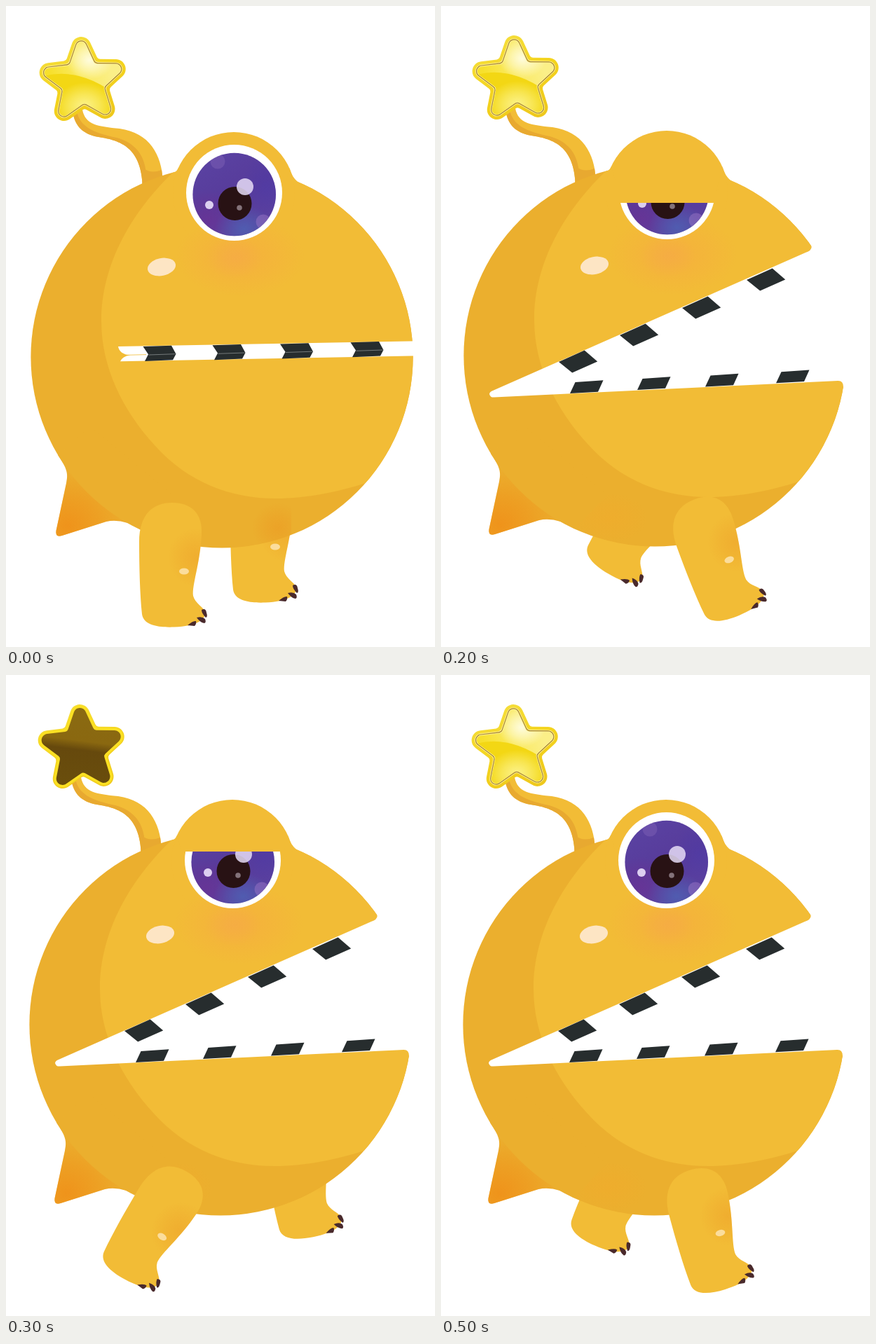
An HTML page with a canvas that plays this animation: 612 by 915 pixels, repeating every 600 ms.

```html
<!DOCTYPE html>
<html lang="en">
<head>
<meta charset="utf-8">
<title>Walking monster</title>
<style>
html, body { margin: 0; width: 100%; height: 100%; overflow: hidden; background: #fff; }
canvas { display: block; }
</style>
</head>
<body>
<canvas id="stage" width="612" height="915"></canvas>
<script>
const ctx = document.getElementById('stage').getContext('2d');
const LIGHT = '#f2bc36', SHADE = '#ebaf2e', INK = '#272d2e', CLAW = '#4a2a2c';
const STEP = 100;

// Walk poses: body shift, eyelid height, legs as [x, y, degrees]
const poses = [
  { dx: 0, dy: 0, lid: 0, near: [237, 745, 0], far: [367, 710, 0] },
  { dx: -.5, dy: -1, lid: 254, dark: true, near: [244, 743, 23], far: [362, 691, -22] },
  { dx: -3, dy: -2, lid: 281, open: true, near: [374, 738, -20], far: [313, 690, 33] },
  { dx: -2, dy: -2, lid: 252, open: true, dark: true, near: [240, 740, 31], far: [413, 663, -9] },
  { dx: -.8, dy: 0, lid: 283, near: [267, 740, 10], far: [387, 690, -7] },
  { dx: -4, dy: -2, lid: 0, open: true, near: [366, 741, -15], far: [279, 686, 26] }
];

function shape(d, color) {
  ctx.fillStyle = color;
  ctx.fill(new Path2D(d));
}

function oval(x, y, rx, ry, color, turn = 0) {
  ctx.beginPath();
  ctx.ellipse(x, y, rx, ry, turn, 0, Math.PI * 2);
  ctx.fillStyle = color;
  ctx.fill();
}

const disc = (x, y, r, color) => oval(x, y, r, r, color);

// Soft spot of an 'r,g,b' colour
function glow(x, y, rx, ry, rgb, alpha) {
  ctx.save();
  ctx.translate(x, y);
  ctx.scale(1, ry / rx);
  const g = ctx.createRadialGradient(0, 0, 0, 0, 0, rx);
  g.addColorStop(0, `rgba(${rgb},${alpha})`);
  g.addColorStop(.5, `rgba(${rgb},${alpha * .55})`);
  g.addColorStop(1, `rgba(${rgb},0)`);
  disc(0, 0, rx, g);
  ctx.restore();
}

function ramp(x0, y0, x1, y1, stops) {
  const g = ctx.createLinearGradient(x0, y0, x1, y1);
  stops.forEach(([at, color]) => g.addColorStop(at, color));
  return g;
}

function clipped(path, draw) {
  ctx.save();
  ctx.clip(path);
  draw();
  ctx.restore();
}

const legPath = new Path2D('M-47 20C-47-20-27-36 0-36C28-36 44-20 42 10C40 50 28 82 30 97' +
  'C33 108 43 111 48 121C46 132 35 140 3 141.5C-22 142.5-41 138-43 123C-46 95-47 55-47 20Z');

function leg([x, y, deg]) {
  ctx.save();
  ctx.translate(x, y);
  ctx.rotate(deg * Math.PI / 180);
  ctx.fillStyle = LIGHT;
  ctx.fill(legPath);
  clipped(legPath, () => glow(34, 42, 40, 42, '236,150,36', .38));
  oval(17, 62, 7, 4.5, '#fbdd9c');
  shape('M42 117Q48 114 49 121Q51 127 48 128Q42 122 42 117Z' +
    'M35 128Q43 126 47 130Q49 135 46 136Q40 135 35 128Z' +
    'M22 139Q30 132 34 133Q35 137 32 140Z', CLAW);
  ctx.restore();
}

function antenna() {
  shape('M95 150C98 172 110 183 132 187C164 192 193 202 195 258L224 250' +
    'C222 212 205 181 162 175C132 172 113 170 109 148Z', LIGHT);
  shape('M95 150C98 172 110 183 132 187C164 192 193 202 195 258L199 232' +
    'C195 208 180 194 158 188C124 181 105 172 101 150Z', '#e8a930');
  shape('M197 232Q207 240 222 234L224 254L194 258Z', '#e8a930');
}

// Star outline grown outwards by pad, with rounded tips and notches
function starPath(pad) {
  const path = new Path2D();
  const at = i => {
    const a = (-93 + 36 * i) * Math.PI / 180;
    const r = i % 2 ? 22 + 1.18 * pad : 50 + 2.69 * pad;
    return [110 + r * Math.cos(a), 108 + r * Math.sin(a)];
  };
  const [ax, ay] = at(0), [bx, by] = at(1);
  path.moveTo((ax + bx) / 2, (ay + by) / 2);
  for (let i = 1; i <= 10; i++) path.arcTo(...at(i), ...at(i + 1), i % 2 ? 5 : pad);
  path.closePath();
  return path;
}

function starLayer(pad, paint) {
  ctx.fillStyle = paint;
  ctx.fill(starPath(pad));
}

function star(dark) {
  starLayer(14, ramp(80, 50, 140, 160, [[0, '#f5de3c'], [.5, '#f4d41e'], [1, '#eec81c']]));
  if (dark) {
    starLayer(12.5, '#fbe022');
    starLayer(9, ramp(118, 50, 104, 160,
      [[0, '#8a6a12'], [.42, '#8a6810'], [.54, '#66490d'], [1, '#6a4e0c']]));
    return;
  }
  starLayer(9.6, '#fff3a0');
  starLayer(8.7, '#a8862a');
  starLayer(7.5, '#fbf0a0');
  starLayer(6.7, ramp(65, 100, 140, 70, [[0, '#f7e02c'], [.5, '#faea62'], [1, '#fbef88']]));
  clipped(starPath(6.7), () => {
    glow(119, 77, 34, 28, '255,255,240', .85);
    shape('M50 101Q100 86 152 123V175H50Z', '#f3d714');
    glow(112, 143, 42, 34, '254,248,160', .85);
  });
}

const bodyPath = new Path2D();
bodyPath.arc(308, 501, 272.6, 0, Math.PI * 2);
const tailPath = new Path2D('M74 641C87 660 89 667 86 681L71.5 749Q70 759 80 756L143 736' +
  'Q167 731 194 748L240 700L120 600Z');
const trunk = new Path2D(bodyPath);
trunk.addPath(tailPath);

function body(open) {
  ctx.fillStyle = SHADE;
  ctx.fill(bodyPath);
  ctx.fill(tailPath);
  clipped(trunk, () => {
    glow(88, 742, 90, 82, '240,140,22', .8);
    if (open) glow(243, 733, 55, 36, '240,172,44', .7);
    else {
      ctx.beginPath();
      ctx.rect(350, 690, 57, 90);
      ctx.clip();
      glow(388, 745, 37, 36, '236,150,32', .5);
    }
  });
  clipped(bodyPath, () => shape('M242 234C180 292 136 368 136 450C136 515 166 577 213 628' +
    'C260 680 320 703 385 703C430 703 475 693 513 681L620 640V200Z', LIGHT));
  disc(325, 267, 87, LIGHT);
  shape('M404 231Q408 244 416 251L396 266Z M246 231Q243 238 236 239L252 252Z', LIGHT);
  glow(334, 357, 92, 58, '250,160,70', .4);
  glow(326, 359, 40, 30, '246,168,74', .5);
  oval(222, 372.5, 20.3, 12.5, '#fde5c4', -.2);
}

const irisPath = new Path2D();
irisPath.arc(325.7, 269, 59.3, 0, Math.PI * 2);

function eye(lid) {
  const view = new Path2D();
  view.rect(240, lid, 180, 400 - lid);
  clipped(view, () => {
    disc(325.5, 266.5, 68.5, '#fff');
    clipped(irisPath, () => {
      disc(325.7, 269, 60, ramp(290, 215, 355, 330,
        [[0, '#5a42a2'], [.5, '#573b9a'], [1, '#5c429f']]));
      glow(288, 305, 48, 44, '118,44,144', .45);
      glow(340, 318, 42, 34, '76,104,184', .7);
      glow(372, 258, 36, 46, '76,58,170', .5);
      disc(302, 222, 10.5, 'rgba(140,110,190,.35)');
      disc(367, 308, 10.5, 'rgba(160,120,200,.45)');
    });
    disc(326.5, 282, 24, '#281214');
    disc(341, 258, 12, 'rgba(228,218,245,.86)');
    disc(290, 284, 6, '#dccff0');
    disc(333, 288, 3.8, '#84737a');
  });
}

function closedMouth() {
  shape('M160 486L590 478.2V499.3L163 507.3Q166 500 177 498.5Q162 497 160 486Z', '#fff');
  ctx.lineWidth = .8;
  ctx.strokeStyle = LIGHT;
  ctx.stroke(new Path2D('M172 498.3L200 497.6'));
  ctx.strokeStyle = '#8a8e8e';
  [[195.5, 486], [294.5, 484.3], [391, 482.5], [491.5, 480.3]].forEach(([x, y]) => {
    shape(`M${x} ${y}l40.5 -1.3l6.5 12l-4.5 8.6l-40 1.6l5 -9.6Z`, INK);
    ctx.stroke(new Path2D(`M${x + 8} ${y + 12}l38 -1.3`));
  });
}

function openMouth() {
  shape('M620 300L528 341Q531 348.5 520 352L74 549Q67 552 70 556Q71 559 76 558.5' +
    'L566 535Q574 534.5 574 544L620 546Z', '#fff');
  [[168, 508], [255, 470], [344, 431], [436, 391]].forEach(([x, y]) =>
    shape(`M${x} ${y}l36.7 -16.5l18.5 16l-36 16Z`, INK));
  [[184, 553], [280, 548], [377, 543.5], [478, 538.3]].forEach(([x, y]) =>
    shape(`M${x} ${y}l7.5 -16l40 -2.7l-7.5 16.4Z`, INK));
}

function draw(pose) {
  ctx.fillStyle = '#fff';
  ctx.fillRect(0, 0, 612, 915);
  leg(pose.far);
  ctx.save();
  ctx.translate(pose.dx, pose.dy);
  antenna();
  star(pose.dark);
  body(pose.open);
  eye(pose.lid ? pose.lid - pose.dy : 0);
  if (!pose.open) closedMouth();
  ctx.restore();
  if (pose.open) {
    ctx.save();
    ctx.translate(pose.dx + 3, 0);
    openMouth();
    ctx.restore();
  }
  leg(pose.near);
}

let start;
function tick(now) {
  start ??= now;
  draw(poses[Math.floor((now - start) / STEP) % poses.length]);
  requestAnimationFrame(tick);
}
draw(poses[0]);
requestAnimationFrame(tick);
</script>
</body>
</html>
```
